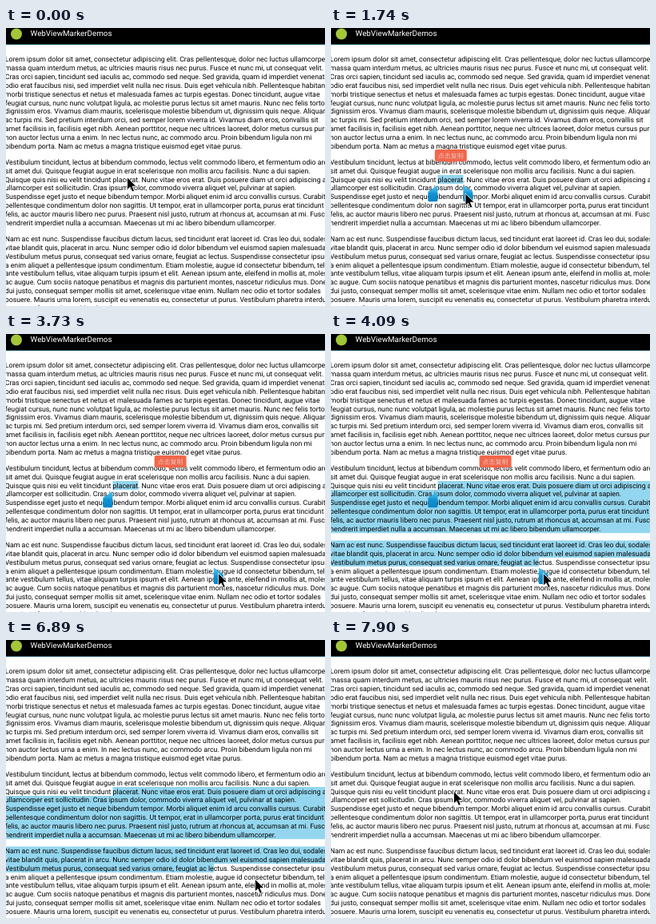
An HTML page that plays this animation: 399 by 348 pixels, repeating every 8000 ms.

```html
<!DOCTYPE html>
<html lang="la">
<head>
<meta charset="utf-8">
<title>WebViewMarkerDemos</title>
<style>
  html, body { margin: 0; width: 100%; height: 100%; overflow: hidden; background: #fff; }
  svg { display: block; }
  text { font-family: Roboto, sans-serif; text-rendering: geometricPrecision; white-space: pre; }
  #page { font-size: 8.79px; }
  #popup text { font: 8px "Noto Sans CJK SC", "Noto Sans CJK", sans-serif; }
</style>
</head>
<body>
<svg width="399" height="348" viewBox="0 0 399 348">
  <defs>
    <linearGradient id="blue" x2="0" y2="1">
      <stop offset="0" stop-color="#55c3ec"/>
      <stop offset=".4" stop-color="#27a5de"/>
      <stop offset=".5" stop-color="#1192d3"/>
      <stop offset="1" stop-color="#0b84c4"/>
    </linearGradient>
    <path id="handle" fill="url(#blue)"
      d="M0 0L11 7.5Q12 8.3 12 9.5V19Q12 20.5 10.5 20.5H1.5Q0 20.5 0 19Z"/>
  </defs>

  <g fill="#94d6ef">
    <rect id="word" x="133.5" y="184" width="32" height="11"/>
    <path id="passage" d="M133.5 184H399V249.3H0V195H133.5ZM0 258.5H399V280H260V291H0Z"/>
  </g>
  <g id="page"></g>

  <rect width="399" height="20" fill="#000"/>
  <rect y="20" width="399" height="1" fill="#14506a"/>
  <circle cx="13" cy="7.5" r="7" fill="#a4c639"/>
  <text x="30.6" y="9.8" font-size="9.8" fill="#fff">WebViewMarkerDemos</text>

  <g id="handles">
    <use href="#handle" transform="translate(133.3 196.8) scale(-1 1)"/>
    <use id="endHandle" href="#handle"/>
  </g>
  <g id="popup">
    <path fill="#f3674c" d="M2.5 0H37.5Q40 0 40 2.5V12.5Q40 15 37.5 15H23L20 18 17 15H2.5Q0 15 0 12.5V2.5Q0 0 2.5 0Z"/>
    <text x="20" y="10.6" text-anchor="middle" fill="#e6c3b8">点击复制</text>
  </g>
  <path id="cursor" fill="#000" stroke="#fff" stroke-width=".8"
    d="M0 0V15.6L3.6 12.2 6.2 18 8.8 16.9 6.3 11.2H11.2Z"/>
</svg>
<script>
const paragraphs = [
`Lorem ipsum dolor sit amet, consectetur adipiscing elit. Cras pellentesque, dolor nec luctus ullamcorper,
massa quam interdum metus, ac ultricies mauris risus nec purus. Fusce et nunc mi, ut consequat velit.
Cras orci sapien, tincidunt sed iaculis ac, commodo sed neque. Sed gravida, quam id imperdiet venenatis,
odio erat faucibus nisi, sed imperdiet velit nulla nec risus. Duis eget vehicula nibh. Pellentesque habitant
morbi tristique senectus et netus et malesuada fames ac turpis egestas. Donec tincidunt, augue vitae
feugiat cursus, nunc nunc volutpat ligula, ac molestie purus lectus sit amet mauris. Nunc nec felis tortor,
dignissim eros. Vivamus diam mauris, scelerisque molestie bibendum ut, dignissim quis neque. Aliquam
ac turpis mi. Sed pretium interdum orci, sed semper lorem viverra id. Vivamus diam eros, convallis sit
amet facilisis in, facilisis eget nibh. Aenean porttitor, neque nec ultrices laoreet, dolor metus cursus purus,
non auctor lectus urna a enim. In nec lectus nunc, ac commodo arcu. Proin bibendum ligula non mi
bibendum porta. Nam ac metus a magna tristique euismod eget vitae purus.`,
`Vestibulum tincidunt, lectus at bibendum commodo, lectus velit commodo libero, et fermentum odio arcu
sit amet dui. Quisque feugiat augue in erat scelerisque non mollis arcu facilisis. Nunc a dui sapien.
Quisque quis nisi eu velit tincidunt placerat. Nunc vitae eros erat. Duis posuere diam ut orci adipiscing a
ullamcorper est sollicitudin. Cras ipsum dolor, commodo viverra aliquet vel, pulvinar at sapien.
Suspendisse eget justo et neque bibendum tempor. Morbi aliquet enim id arcu convallis cursus. Curabitur
pellentesque condimentum dolor non sagittis. Ut tempor, erat in ullamcorper porta, purus erat tincidunt
felis, ac auctor mauris libero nec purus. Praesent nisl justo, rutrum at rhoncus at, accumsan at mi. Fusce
hendrerit imperdiet nulla a accumsan. Maecenas ut mi ac libero bibendum ullamcorper.`,
`Nam ac est nunc. Suspendisse faucibus dictum lacus, sed tincidunt erat laoreet id. Cras leo dui, sodales
vitae blandit quis, placerat in arcu. Nunc semper odio id dolor bibendum vel euismod sapien malesuada.
Vestibulum metus purus, consequat sed varius ornare, feugiat ac lectus. Suspendisse consectetur ipsum
a enim aliquet a pellentesque ipsum condimentum. Etiam molestie, augue id consectetur bibendum, tellus
ante vestibulum tellus, vitae aliquam turpis ipsum et elit. Aenean ipsum ante, eleifend in mollis at, molestie
ac augue. Cum sociis natoque penatibus et magnis dis parturient montes, nascetur ridiculus mus. Donec
dui justo, consequat semper mollis sit amet, scelerisque vitae enim. Nullam nec odio et tortor sodales
posuere. Mauris urna lorem, suscipit eu venenatis eu, consectetur ut purus. Vestibulum pharetra interdum
mauris, in feugiat lorem blandit vel.`];

const LINE = 10.86, GAP = 9.14, LOOP = 8000;
const el = id => document.getElementById(id);

let baseline = 42.3;
for (const paragraph of paragraphs) {
  for (const line of paragraph.split('\n')) {
    const text = document.createElementNS('http://www.w3.org/2000/svg', 'text');
    text.setAttribute('x', -1.3);
    text.setAttribute('y', baseline);
    text.textContent = line;
    el('page').append(text);
    baseline += LINE;
  }
  baseline += GAP;
}

// Keys: [time, x, y]
const cursorPath = [
  [1190, 151.7, 187], [1440, 170, 203], [1560, 178.5, 209], [1740, 168, 207],
  [2120, 168, 207], [2550, 220, 267], [2860, 265.5, 299.5],
  [5409, 265.5, 299.5], [5410, 264.5, 300], [5970, 264.5, 300], [6230, 311.5, 299.3],
  [7040, 311.5, 299.3], [7250, 265, 250], [7450, 195, 185], [7570, 165, 163],
  [7780, 152.5, 188.5], [7899, 152.5, 188.5], [7900, 153.5, 189.3]];
const handlePath = [
  [2150, 165.4, 196.8], [2550, 200.6, 246.8], [2910, 259.8, 288.5],
  [2959, 259.8, 288.5], [2960, 259.8, 290.5], [3729, 259.8, 290.5], [3730, 259.8, 292.5]];

function pointAt(path, t) {
  const i = path.findIndex(key => key[0] > t);
  if (i < 1) return path.at(i).slice(1);
  const [t0, x0, y0] = path[i - 1], [t1, x1, y1] = path[i];
  const k = (t - t0) / (t1 - t0);
  return [x0 + (x1 - x0) * k, y0 + (y1 - y0) * k];
}

const place = (id, [x, y]) => el(id).setAttribute('transform', `translate(${x} ${y})`);
const show = (id, visible) => el(id).setAttribute('visibility', visible ? 'visible' : 'hidden');

function draw(now) {
  const t = now % LOOP;
  const within = (start, end) => t >= start && t < end;
  show('handles', within(500, 6890));
  show('popup', within(560, 1910) || within(3380, 6590));
  show('word', within(860, 4090));
  show('passage', within(4090, 7250));
  place('popup', [t < 3000 ? 129.8 : 185.6, 152]);
  place('endHandle', pointAt(handlePath, t));
  place('cursor', pointAt(cursorPath, t));
}

const start = performance.now();
function tick() {
  draw(performance.now() - start);
  requestAnimationFrame(tick);
}
tick();
</script>
</body>
</html>
```
